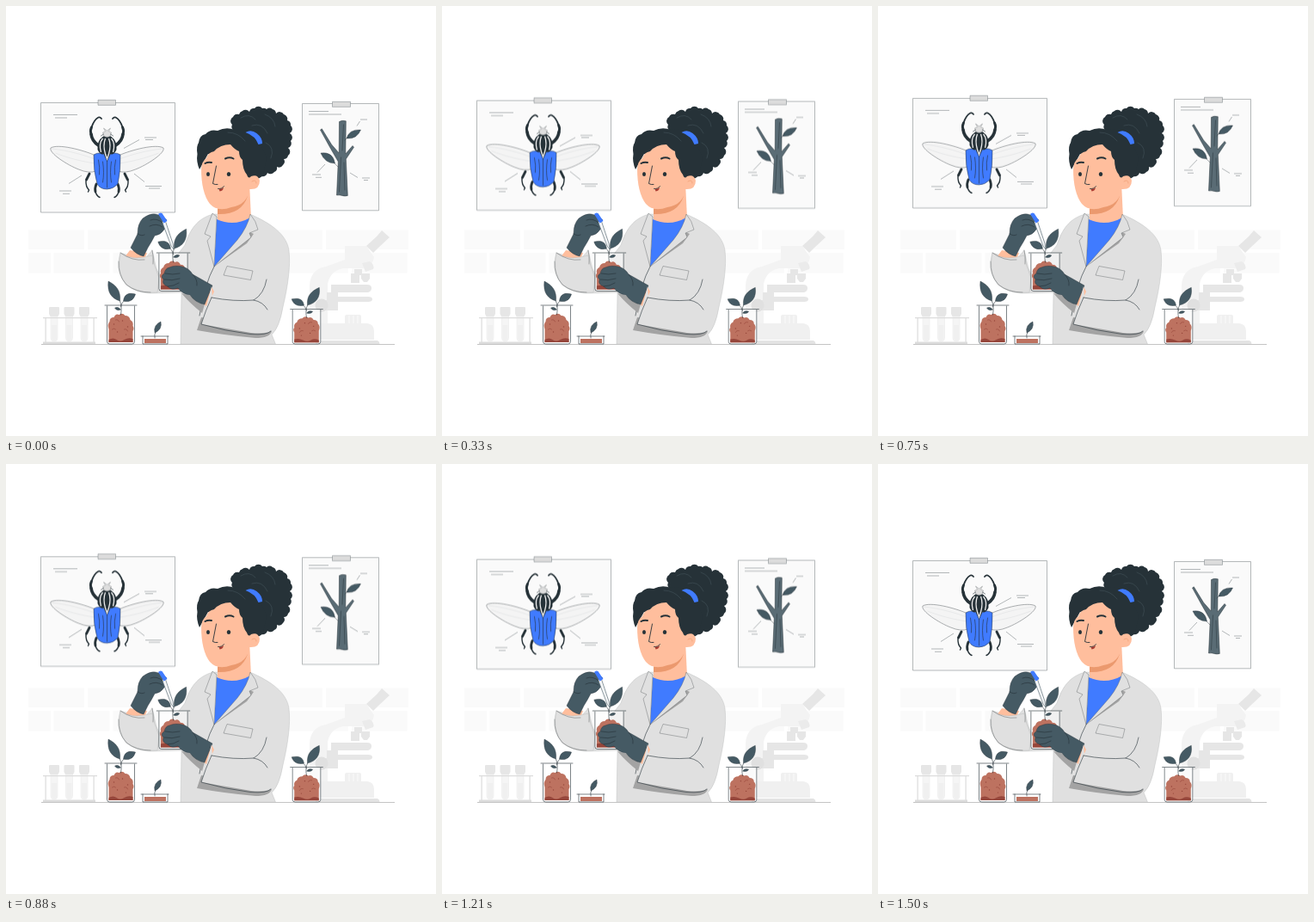
Animation of 500x500 px, one loop 1.54 s. Source, as an HTML page:

```html
<!DOCTYPE html>
<html lang="en">
<head>
<meta charset="utf-8">
<title>Botany lab</title>
<style>
html, body { margin: 0; width: 100%; height: 100%; overflow: hidden; background: #fff; }
svg { display: block; width: 100vw; height: 100vh; }
.ln { fill: none; stroke: #263238; stroke-width: .6; stroke-linecap: round; stroke-linejoin: round; }
.thin { fill: none; stroke: #82888b; stroke-width: .6; }
.paper { fill: #fafafa; stroke: #858b8e; stroke-width: .6; }
.clip { fill: #dcdcdc; stroke: #737a7e; stroke-width: .5; }
.dark { fill: #263238; }
.slate { fill: #455a64; }
.leaf { fill: #455a64; stroke: #263238; stroke-width: .4; }
.blue { fill: #407bff; }
.skin { fill: #ffbe9d; }
.coat { fill: #e0e0e0; stroke: #b3b5b6; stroke-width: .4; }
.fold { stroke: #55595c; }
.leg { fill: none; stroke: #263238; stroke-width: 1.4; stroke-linecap: round; stroke-linejoin: round; }
.thick { stroke-width: 2.8; }
</style>
</head>
<body>
<svg viewBox="0 0 500 500">
<defs>
  <g id="plant">
    <path class="ln" d="M0 11C1 5 1 0-1-5M0 2Q1-4 5-6"/>
    <path class="leaf" d="M-1-5C-11-8-16-15-14.500-28C-5-23 0-17-1-5Z"/>
    <path class="leaf" d="M3-5C4-13 9-15 17-13C15-6 10-3 3-5Z"/>
    <path class="leaf" d="M-7 3Q-3 1 0 5Q-5 7-7 3Z"/>
  </g>
  <g id="beaker">
    <path fill="#fff" fill-opacity=".55" d="M-16 0H16V42Q16 45 13 45H-13Q-16 45-16 42Z"/>
    <path fill="#bd7260" d="M-14 43V28Q-16 22-13 19Q-13 14-8 14Q-6 9-2 11Q2 8 5 12Q10 12 11 17Q15 19 14 24Q16 27 14 30V43Z"/>
    <path fill="#96463b" d="M-14 40Q-9 37-5 40T4 40T14 39V43H-14Z"/>
    <g fill="#96463b"><circle cx="-8" cy="22" r=".7"/><circle cx="2" cy="18" r=".7"/><circle cx="8" cy="25" r=".7"/><circle cx="-4" cy="31" r=".7"/><circle cx="6" cy="34" r=".6"/></g>
    <path class="ln" style="stroke:#96463b" d="M-6 17Q-3 16-2 19M4 28Q7 27 8 30M-10 28Q-8 26-6 28"/>
    <use href="#plant"/>
    <path class="ln" d="M-18.500 0H18.500M-16 1V42Q-16 45-13 45H13Q16 45 16 42V1"/>
  </g>
  <g id="wing">
    <path fill="#f4f4f4" stroke="#747a7d" stroke-width=".6" d="M-13 174C-29 167-57 160-65.500 165C-68 171-46 185-33 190Q-21 195-13 192Z"/>
    <path stroke="#d5d7d8" stroke-width=".4" fill="none" d="M-14 178C-28 173-45 168-64 166M-14 183C-28 181-45 177-60 171"/>
  </g>
  <g id="limbs">
    <path class="leg thick" style="stroke-width:3.600" d="M-10 162C-16 158-18 154-18.500 149"/>
    <path class="leg thick" d="M-18.500 149Q-20 145-18 141"/>
    <path class="leg" style="stroke-width:1.800" d="M-18 141C-16 135-13 131-10 129.500Q-8 129-6.500 131"/>
    <path class="leg thick" d="M-20.500 195L-24 202"/>
    <path class="leg" d="M-24.500 203Q-25 210-21 214L-22 216"/>
    <path class="leg thick" d="M-12.500 207Q-14.500 212-13.500 216"/>
    <path class="leg" d="M-13.500 216Q-12 221-8.500 222.500"/>
  </g>
  <g id="tube">
    <path fill="#e6e6e6" d="M0 351Q0 350 1 350H11Q12 350 12 351V358L10.500 361H1.500L0 358Z"/>
    <path fill="#f5f5f5" stroke="#ebebeb" stroke-width=".6" d="M2 361H10V386Q10 390 6 390T2 386Z"/>
    <path fill="#f0f0f0" d="M3 371H9V386Q9 389 6 389T3 386Z"/>
  </g>
</defs>

<g fill="#fafafa">
  <path d="M26 260.500H91V283H26ZM95 260.500H160V283H95ZM26 287H52V310.500H26ZM55.500 287H120.500V310.500H55.500ZM124.500 287H190V310.500H124.500Z"/>
  <path d="M303 260.500H368V283H303ZM372 260.500H468V283H372ZM300 287H398V310.500H300ZM402 287H466.500V310.500H402Z"/>
</g>

<g class="float">
  <path class="paper" d="M40.500 112.500H196.500V240H40.500Z"/>
  <path class="clip" d="M107 109.300H127.500V115.300H107Z"/>
  <path class="thin" d="M55 126.500H83M57 130H71M161 153H175M162 155.500H171M62 215H76M66 218.300H74M162 209.500H181M166 212H179M73 206.500L88 197M137 165.500L155 155.500M149 195L161 204.500"/>
  <g transform="translate(117.500)">
    <use href="#wing"/><use href="#wing" transform="scale(-1 1)"/>
    <use href="#limbs"/><use href="#limbs" transform="scale(-1 1)"/>
    <path class="blue" stroke="#263238" stroke-width=".5" d="M-15.500 173Q-8 168 0 175Q8 168 15.500 173Q16 191 12.500 207Q7 213 0 213Q-8 213-11.500 207Q-16 191-15.500 173Z"/>
    <path class="ln" d="M0 175V211M-10 179Q-8 188-9 196M-5 181Q-3 194-5 205M10 179Q8 188 9 196M5 181Q3 194 5 205"/>
    <path class="dark" d="M-5 152Q0 148 5 152Q12 157 11 167Q8 174 4 172L0 181L-4 172Q-8 174-11 167Q-12 157-5 152Z"/>
    <path fill="none" stroke="#f0f0f0" stroke-width="1.300" d="M-5 154Q-10 160-7 170M5 154Q10 160 7 170M-2 154Q-5 162-2 172L0 178L2 172Q5 162 2 154"/>
    <path d="M-4 151L-5 147L-2 146L-4 142L0 145L4 142L2 146L5 147L4 151Q0 154-4 151Z" fill="#dedede" stroke="#7c8285" stroke-width=".4"/>
    <path class="ln" d="M-4 149L-7 151M4 149L7 151"/>
  </g>
</g>

<g class="float">
  <path class="paper" d="M344.500 113.500H433.500V237.800H344.500Z"/>
  <path class="clip" d="M379.500 111.300H400.500V117.300H379.500Z"/>
  <path class="thin" d="M352 122.500H375M352 126H390M412 132H420M408 139.500L411.500 134M356 196H366M360 199.300H367M362 193.500L371 184M400 194L409 199.500M414 200H423M416 202.500H421"/>
  <path fill="#5a6c75" stroke="#263238" stroke-width=".5" d="M387.500 134.500Q391 132.500 395.300 133.800L394.800 172L403 162.500L404.500 164.200L395.300 178L397.300 220.500Q394 221.500 391 220.500T384.500 220L386.300 181L376.500 164L365.500 144L367.300 142.800L378.500 161L387.200 171Z"/>
  <path class="ln" style="stroke-width:.5" d="M392.500 138L391 168M389.500 176L387.500 216M393 182L394 214"/>
  <path class="leaf" d="M396 154Q399 143 412.500 144Q408 155 396 154Z"/>
  <path class="leaf" d="M366 171Q380 169 382.500 183Q371 183 366 171Z"/>
  <path class="ln" style="stroke-width:.4" d="M394 156L397 153M386 187L382 183"/>
</g>

<g>
  <path fill="#f3f3f3" d="M394 279H419L428 292Q426 304 417 305H392Q377 308 374 323V370H353V325Q354 306 372 303L394 295Z"/>
  <path fill="#e6e6e6" d="M419 279L431 268L437 261L446 269L433 281L427 287Z"/>
  <path fill="#ebebeb" d="M414 299L423 297Q429 301 427 306L418 309Z"/>
  <path fill="#e6e6e6" d="M405 306H414V311H423V317L420 321H416L413 317V313H411V322H401V311H405Z"/>
  <path fill="#e6e6e6" d="M378 324H420Q425 324 425 328T421 333H378ZM373 333H386V342H373ZM374 338H421Q426 338 426 341T421 344H374ZM367 342H386V354H367Z"/>
  <circle cx="367" cy="348" r="7.500" fill="#e0e0e0"/>
  <path fill="#f0f0f0" d="M394 361Q394 359 396 359H411Q413 359 413 361V369H394ZM362 369H420Q428 370 428 378V388H362Z"/>
  <path fill="#e3e3e3" d="M360 389H432Q434.500 390 434.500 393H360Z"/>
  <path stroke="#fafafa" d="M399 360V369M404 360V369M409 360V369"/>
</g>

<g>
  <use href="#tube" x="50"/><use href="#tube" x="67.500"/><use href="#tube" x="85"/>
  <path fill="#dcdcdc" d="M43 362H106V363.200H43ZM45.500 363H46.700V391H45.500ZM101.500 363H102.700V391H101.500ZM43 390.500H104V393H43Z"/>
</g>
<path stroke="#b5b5b5" stroke-width=".8" d="M41 393.500H452"/>

<g>
  <path class="coat" d="M241 242C222 247 214 260 208 278L180 314C173 306 173 294 170 284L160 296L133 287C129 301 131 314 140 324C148 331 158 334 170 334L204 333L203 393.300H313.500L309 382Q318 374 322 350C328 325 331 302 329 284C326 265 308 253 286 243Z"/>
  <path class="skin" d="M144 284L138 292Q150 298 161 295L164 287Z"/>
  <path class="coat" d="M133 287Q147 297 170 290Q172 302 178 316L176 333Q155 335 140 324Q128 310 133 287Z"/>
  <path class="ln" style="stroke:#777b7d" d="M133 287Q147 297 161 295M131 297Q130 313 140 324Q151 333 168 333M170 284Q172 292 171 300"/>
  <path class="skin" d="M246 214L246 251Q264 258 285 247L283 205Z"/>
  <path class="blue" d="M245 248Q265 257 284 246L286 250L274 270L242 303Z"/>
  <path fill="#eb996e" d="M246 236Q266 234 281 221Q274 243 246 242Z"/>
  <path fill="#a3a3a3" d="M284 263L288 265L280 276L246 300Z"/>
  <path class="coat fold" d="M245 245L240 241L231 265L238 268L234 273L242 303Z"/>
  <path class="coat fold" d="M284 242Q291 250 293 260L283 264L285 269L242 303L269 272Q281 257 284 242Z"/>
  <path class="ln" d="M242 303Q231 323 225 360"/>
  <path class="coat fold" d="M257 302.500L287 308L284.500 318.500L253 313Z"/>
</g>

<g>
  <path class="dark" id="bun"/>
  <path class="dark" d="M225 190Q221 181 222.500 172Q221 163 224 159Q225 150 232 149Q237 143 246 145Q256 140 266 144Q280 142 291 150L303 176L299 197Q292 203 282 204L262 180L235 172Z"/>
  <path class="skin" d="M227 189Q228 180 233 177Q235 170 242 169Q249 161 261 161Q266 167 271 169Q271 176 275 179Q275 190 280 196Q282 202 285 198Q293 195 295 203Q295 214 283 213Q281 231 262 234Q246 240 237 230Q227 217 227 189Z"/>
  <path class="blue" d="M278.500 147Q285 143 291.500 148Q298 153 298 160L293.500 161Q290 151 278.500 147Z"/>
  <path class="ln" style="stroke:#52636b;stroke-width:.4" d="M273 130Q283 124 290 132M301 126Q312 130 313 140M286 139Q298 135 304 148M302 159Q313 164 308 177M258 147Q270 147 278 157"/>
  <path class="ln" style="stroke-width:2" d="M231.500 183Q235 181 239 182M255 177.500Q260 175 264.500 177.500"/>
  <ellipse class="dark" cx="235" cy="195.500" rx="2" ry="2.500"/>
  <ellipse class="dark" cx="259" cy="195.500" rx="2.200" ry="2.500"/>
  <path class="ln" style="stroke-width:.9" d="M244.500 186L240.500 206.500Q243 208 246 207.500"/>
  <path fill="#a93c32" d="M247.500 212.500Q251 213 253 211Q252.500 215 248.500 215.500Z"/>
  <path class="ln" style="stroke-width:.8" d="M246.500 212.500Q251 213 253.500 209.500"/>
  <path class="ln" style="stroke:#eb996e" d="M286 204Q291 201 291 206"/>
</g>

<use href="#beaker" transform="translate(194.500 287) scale(-1.040 .99)"/>
<g>
  <path class="slate" stroke="#263238" stroke-width=".4" d="M145 281L153 265Q153 253 159 247Q167 241 174 242Q183 244 187 249L183 252Q188 256 183 261Q180 266 173 267Q170 273 165 281L160 291Q151 289 145 281Z"/>
  <path fill="#f4f6f7" stroke="#455a64" stroke-width=".6" d="M181.500 251L185 249L194 276L195 283L192 279Z"/>
  <path class="blue" d="M177 242Q179 239.500 181.500 241L187.500 250L183.500 252.500Z"/>
  <path class="ln" d="M168 249Q175 246 182 252M167 256Q175 252 182 257M153 265Q158 268 161 266"/>
</g>
<g>
  <path class="skin" d="M238 325L242 332L234 350L228 345Z"/>
  <path fill="#a3a3a3" d="M204 334L216 337Q223 346 231 347L228 357Q213 345 204 334Z"/>
  <path class="slate" stroke="#263238" stroke-width=".4" d="M190 304Q196 301 205 303Q213 305 217 312L240 325L231 347Q220 345 214 336Q205 335 200 328Q192 331 188 326Q181 324 183 318Q179 314 184 311Q185 305 190 304Z"/>
  <path class="ln" d="M185 311Q194 313 202 311M184 318Q193 320 202 317M188 326Q195 326 201 322M217 312Q223 318 222 325"/>
  <path fill="#a3a3a3" d="M222 377L227 362L309 378Q307 386 290 386Q255 383 222 377Z"/>
  <path class="coat" style="stroke:none" d="M239 326L240 339L300 341Q313 361 310 377Q303 382 285 380L227 370Q232 354 239 326Z"/>
  <path class="ln" d="M239 339Q265 344 288 342Q300 335 303 318M239 339Q232 354 227 370Q255 378 284 381.500Q304 383 308 378M288 342Q299 344 304 353"/>
</g>

<use href="#beaker" transform="translate(133.500 348)"/>
<use href="#beaker" transform="translate(349.500 352.500) scale(-1.020 .9)"/>
<g>
  <path fill="#bd7260" d="M161 387H186V392H161Z"/>
  <path class="ln" d="M157 384H189M159 384V393H188V384M173 386Q172 382 174 379"/>
  <path class="leaf" d="M173 380Q171 371 180 367Q182 376 173 380Z"/>
</g>
</svg>
<script>
// Scalloped outline of the bun: a small arc bulges between each pair of points.
const rim = [[267,146],[263,138],[264,129],[271,126],[275,122],[283,123],[289,119],[298,119],[303,120],[310,120],
  [314,125],[323,126],[327,133],[331,139],[330,148],[331,157],[328,165],[328,174],[323,178],[322,185],
  [315,187],[312,193],[304,194],[297,198],[288,196],[282,192]];
document.getElementById('bun').setAttribute('d',
  'M' + rim.map(p => p.join(' ')).join('A5.500 5.500 0 0 1 ') + 'Z');

// The wall posters drift up and back down together.
for (const poster of document.querySelectorAll('.float')) {
  poster.animate(
    { transform: ['translateY(0)', 'translateY(-5.200px)'] },
    { duration: 770, delay: -45, iterations: Infinity, direction: 'alternate', easing: 'cubic-bezier(.37,0,.63,1)' }
  );
}
</script>
</body>
</html>
```
